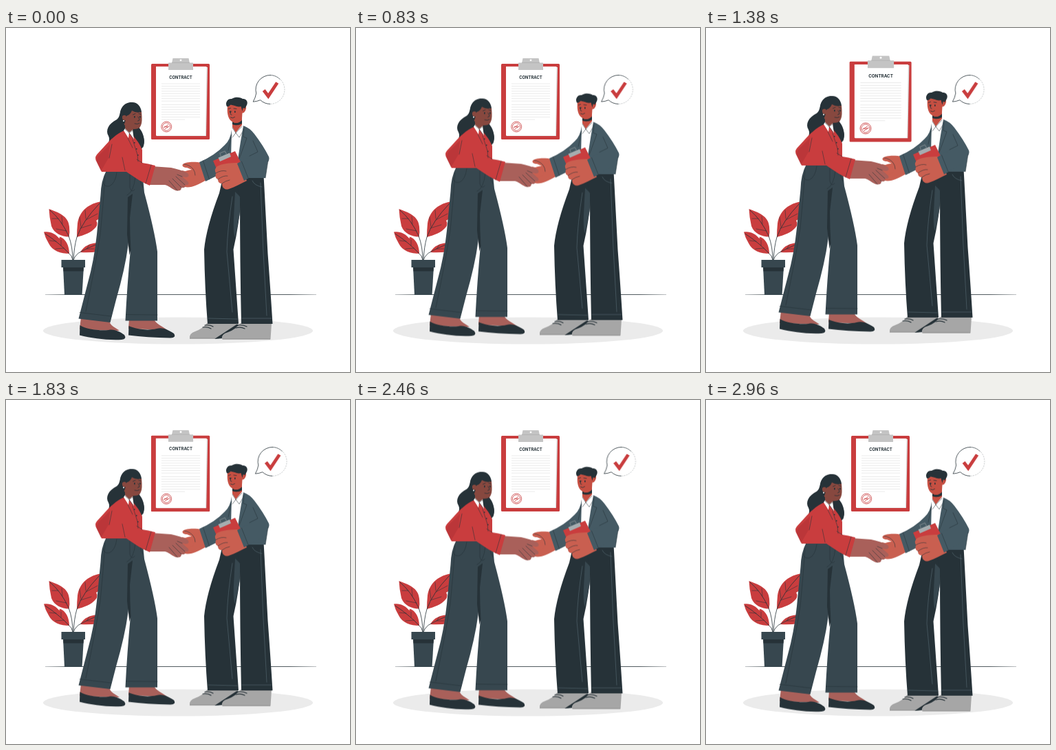
Recreate the animation shown at these times as an HTML page without scripts. Size 500x500 px, loop 3000 ms.

```html
<!DOCTYPE html>
<html lang="en">
<head>
<meta charset="utf-8">
<title>Contract handshake</title>
<style>
  html, body { margin: 0; width: 100%; height: 100%; overflow: hidden; background: #fff; }
  svg { display: block; width: 100%; height: 100%; }
  .red { fill: #c93d3e; }
  .dark { fill: #263238; }
  .slate { fill: #37474f; }
  .jacket { fill: #455a64; }
  .herskin { fill: #a9605a; }
  .herface { fill: #87483f; }
  .hisskin { fill: #c95f50; }
  .hisface { fill: #c54f42; }
  .line { fill: none; stroke: #263238; stroke-width: .8; stroke-linecap: round; stroke-linejoin: round; }
  .fine { stroke-width: .55; }
  .bold { stroke-width: 1.2; }
  .pale { stroke: #5c707a; }
  .title { font: 700 5.9px Inter, "Open Sans", sans-serif; text-anchor: middle; fill: #263238; }

  .float { animation: float 3s linear infinite; }
  .beat { transform-origin: 253.5px 104px; animation: beat 3s ease-in-out infinite; }
  .shake { animation: shake 3s linear infinite; }

  @keyframes float { 50% { transform: translateY(-10px); } }
  @keyframes beat {
    0%, 28%, 66%, 100% { transform: scale(1); }
    14%, 42% { transform: scale(1.065); }
  }
  @keyframes shake {
    10%, 90% { transform: translateX(-1px); }
    20%, 80% { transform: translateX(2px); }
    30%, 50%, 70% { transform: translateX(-4px); }
    40%, 60% { transform: translateX(4px); }
  }
</style>
</head>
<body>
<svg viewBox="0 0 500 500">
  <defs>
    <linearGradient id="fade">
      <stop offset="0" stop-color="#263238" stop-opacity=".3"/>
      <stop offset=".1" stop-color="#263238" stop-opacity=".8"/>
      <stop offset=".9" stop-color="#263238" stop-opacity=".8"/>
      <stop offset="1" stop-color="#263238" stop-opacity=".3"/>
    </linearGradient>
  </defs>

  <rect x="57" y="387" width="394" height="1" fill="url(#fade)"/>
  <ellipse cx="250" cy="440" rx="196" ry="19.6" fill="#ebebeb"/>

  <g id="plant">
    <g class="red">
      <path d="M62.500 263C76 268 91 273 92 289Q93 297 91.500 303.500C81 303 70 299 66 288Q63 275 62.500 263Z"/>
      <path d="M139 252C121 255 107 265 104 284Q103 294 103 304C113 301 124 298 131 289Q134 284 131 280L139 275Z"/>
      <path d="M55 296.500C64 295 72 299 77.500 306L78 303.500C87 306 92 317 92 328C80 328 67 324 62 313Q57 305 55 296.500Z"/>
      <path d="M108 326C113 317 122 312 137 312L134 325Q121 327 108 326Z"/>
    </g>
    <path class="line" stroke-width="1" d="M97 337Q97 318 91 302Q80 278 64 265M98 337Q99 318 103 304Q111 281 136 255M97 337Q96 331 91 327Q78 313 57 299M98 337Q101 329 109 325Q120 319 133 314"/>
    <path class="line fine" d="M82 285L81 274M76 277L67 277M88 295L73 292M109 289L107 275M116 277L115 265M108 291L124 286M116 279L133 270M80 316L80 308M73 310L63 309M84 320L72 321M118 320L121 315M117 321L128 321"/>
    <path class="slate" d="M83 347H113L110.500 388H85Z"/>
    <path class="dark" d="M83 347H113L112.500 353.500H83.500Z"/>
    <path class="slate" d="M80.500 337H115V348H80.500Z"/>
  </g>

  <g class="beat">
    <rect class="red" x="211" y="52" width="85" height="110" rx="1.500"/>
    <path d="M219 57H293L291 157H219Z" fill="#d9d9d9"/>
    <path d="M218 56H291.500L290 156.500H218Z" fill="#fff"/>
    <path d="M236 50.500H272V61H236ZM242.500 44H265.500L267 51H241Z" fill="#c4c4c4"/>
    <path d="M241 50.500H267" stroke="#aaa" stroke-width=".6"/>
    <circle cx="254" cy="46.800" r="1.400" fill="#fff"/>
    <text class="title" x="254" y="73.600">CONTRACT</text>
    <path d="M226 81H282M226 84.600H282M226 88.200H282M226 91.800H282M226 95.400H282M226 99H282M226 102.600H282M226 106.200H282M226 111.400H282M226 115H282M226 118.600H282M226 122.200H282M226 125.800H282M226 129.400H282M226 133H260" stroke="#e3e3e3" stroke-width=".7"/>
    <g fill="none" stroke="#c93d3e" stroke-width=".8">
      <circle cx="233.200" cy="143.500" r="7.500"/>
      <circle cx="233.200" cy="143.500" r="5.700"/>
      <path d="M229 145L236 140.500M230 143.600H236M230.500 147L237.500 142.500"/>
    </g>
  </g>

  <g class="shake">
    <g transform="translate(-.8 0)">
      <circle cx="384.500" cy="89.500" r="21" fill="#fff"/>
      <path class="line" d="M385 68.500A21 21 0 0 0 364.500 95Q363.500 101 360 107.200Q365 107 370.500 104.700A21 21 0 0 0 384.500 110.500"/>
      <path class="line fine" d="M385 68.500A21 21 0 0 1 384.500 110.500" stroke-dasharray="1.500 2" opacity=".45"/>
      <path class="line fine" d="M385 68.500Q393 68.500 399 74.500"/>
      <path d="M375.500 90.500L382 99L395 79.500" fill="none" stroke="#c93d3e" stroke-width="4.800"/>
    </g>
  </g>

  <g class="float">
    <g id="man">
      <path d="M267 451Q266 444 275 441Q286 437 292 429H337V435C326 442 316 449 309 451.500H267Z" fill="#a6a6a6"/>
      <path class="dark" d="M303 452Q320 441 335 431H343L337 437Q324 443 316 451Z"/>
      <path d="M314 452.500Q312 445 323 442Q334 438 340 429H386L384.500 452.500Z" fill="#a6a6a6"/>
      <path d="M267 451H304M315 452H384" stroke="#8f8f8f" stroke-width="1"/>
      <path class="line bold" d="M289 432Q296 431 301 434M286 435Q293 434 298 437M337 432Q344 431 350 434M334 436Q341 434 347 437"/>

      <path class="dark" d="M315 218L310 240Q291 290 288 322Q289 380 293 430H338L330.500 322Q339 285 342 245V216H320Z"/>
      <path class="slate" d="M333 238L341 246L339.500 272L333 304Q330 300 331 275Z"/>
      <path class="dark" d="M336 230L340 246Q340 340 342 430H387.500Q384 375 380.500 328L374.500 214H338Z"/>
      <path class="line pale fine" d="M329 245Q322 290 321 325L329 413M370 225Q373 320 379 418M294 422L336 423M343 422L386 422M358 222Q361 229 372 231"/>

      <path d="M330 146L343 145L352 160L345 200H322L325 160Z" fill="#fff"/>
      <path class="hisface" d="M329 130H343V146L334 153L329 149Z"/>
      <path class="dark" d="M329 136Q336 141 343 134V139Q336 143 329 140Z"/>
      <path d="M329 144L334 152L329 159L326 150ZM343 141L347 146L339 159L334 152Z" fill="#fff"/>
      <path class="line fine" d="M329 145L334 152.500L343 143M334 152.500L329 159M334 152.500L339 159L346 147"/>

      <path class="hisskin" d="M285 196C275 194 262 194 257 198C255 201 259 203 263 203L270 206C260 207 254 211 252 217L256 230C267 234 277 229 291 221Z"/>
      <path class="line fine" d="M259 198Q267 199 272 205Q275 209 275 214"/>
      <path class="jacket" d="M328 148Q326 163 318 170Q304 185 281 195L290 223Q304 216 320 208L327 190Z"/>
      <path class="line fine" d="M286.500 193L295.500 220M328 155L323 178M312 190L323 182"/>

      <path class="jacket" d="M345 142Q354 145 361 154Q374 171 382 187Q383.500 191 380.500 195L377 218H350L342 206L337 191L341 165Z"/>
      <path class="red" d="M301 193L333 179L341 195Q335 207 327 211L307 207Z"/>
      <path d="M308.500 188.500L325 181.500L327 187L311 194Z" fill="#a6adb0"/>
      <path d="M312.500 187L311 182L318 179L320.500 183" fill="none" stroke="#68777e" stroke-width="1.500"/>
      <path class="hisskin" d="M338 196C326 196 314 197 307 201Q302 205 305 211Q303 218 308 220Q308 226 314 226C314 233 319 236 324 234C333 231 341 226 350 222Z"/>
      <path class="line fine" d="M305 211Q313 206 320 208M308 220Q316 214 322 215M314 226Q319 222 325 221"/>
      <path class="jacket" d="M336 197L366 180L382 188Q380 199 372 207L346 222Z"/>
      <path class="line fine" d="M342.500 194L352 218M354 186L366 180L359 164M346 146L345 158L350 160L339 190M381 193L377 218"/>

      <path class="hisface" d="M322 112L346 109Q351 114 348 120Q346 124 343.500 123.500L343 131C341 138 334 140 328.500 136C322 132 321 122 322 112Z"/>
      <path class="dark" d="M321 114C318 109 322 102 328 103C334 99 342 101 344 103C351 103 352 109 349.500 113L347 117L344.500 116L343.500 121L341.500 114C336 116 330 111 326 112Q323 115 321 114Z"/>
      <path class="line" d="M323.500 117.500L326.500 116.500M331 117L335 117.500M327.500 121Q325 125 327 126H328M326.500 130Q329.500 132 332.500 129.500"/>
      <path class="dark" d="M325 120.500h1.600v2.400h-1.600ZM332 120.500h1.600v2.400h-1.600Z"/>
    </g>

    <g id="woman">
      <path class="dark" d="M174 112C163 117 168 128 161 133C149 139 144 149 149 157Q152 163 147 170L197 176C203 168 201 158 197 150Q193 144 190 140Z"/>
      <path class="herskin" d="M109 420L150 425C151 433 160 436 165 440L107 438ZM179 422H214C218 431 229 434 234 439L178 437Z"/>
      <path class="dark" d="M107.500 432C116 438 135 440 149 439C158 437 166 442 172 446Q176 452 168 453C146 454 125 451 107 446.500Z"/>
      <path class="dark" d="M178.500 433C190 438 206 440 219 437C228 434 238 440 244 444Q248 450 239 450.500Q205 450 178 446.500Z"/>

      <path class="slate" d="M146 207Q138 222 137.500 243L132 300Q128 338 119 370L105.500 422.500L151.500 428L160 395Q173 350 177.500 316L179 301L181 322Q176 375 173.500 425.500H220V325Q216 295 201 239L198 207Z"/>
      <path class="dark" d="M177 246L184 241L180 276Q180 300 181.500 322L179.500 330L176 300Z"/>
      <path class="line fine" d="M144 216Q141 260 137 300Q130 345 116 412M107 413.500L153 419M174.500 416.500L220 417M141 224Q142 231 150 230Q159 226 161 210M176 243Q186 238 188 216M180 213L180 232Q182 240 187 235M196 215Q194 225 199 232"/>

      <path class="hisskin" d="M256 207L271 211L273 219L258 226Z"/>
      <path class="herskin" d="M212 201L240 203C248 205 257 207 264 211Q268 216 262 217L256 216L265 224Q267 229 260 228Q262 233 255 232Q255 238 246 236C240 233 236 229 231 228H207Z"/>
      <path class="line fine" d="M247 216L260 228M242 219L255 232M237 222L249 236M256 216L249 213"/>

      <path class="red" d="M172 149C160 154 150 164 143 172L132 184Q128 189 132 195L139 209H175C188 218 199 225 209 229L217 200Q206 197 198 196L198 177Q193 165 183 155Z"/>
      <path d="M151 169L149 189L138 208L132 195Q130 188 139 181Z" fill="#a82d32" opacity=".4"/>
      <path class="line fine" d="M211 199L203 226M198 196L190 191M173 207L169 188M184 162L191 184L192 194M154 169L150 189M177 160L184 174"/>
      <path class="dark" d="M186 166h1.500v1.500h-1.500ZM189 175h1.500v1.500h-1.500ZM191 184h1.500v1.500h-1.500Z"/>
      <path class="dark" d="M185 149Q193 155 194 163Q195 170 199 174C203 165 200 156 195 148L190 143Z"/>
      <path class="herface" d="M173 139H186L184 152L179 155L173 149Z"/>
      <path d="M173 146L179 152L178 160L171 149ZM184 148L186 162L179 152Z" fill="#fff"/>
      <path class="line fine" d="M173 147L179 152.500L184 149M179 152.500L185 161"/>

      <path class="herface" d="M174 121Q186 112 197 122C198 133 198 140 194 145Q187 149 179 145L172 141L168 130Z"/>
      <path class="dark" d="M167 133C163 117 172 108 182 108C190 107 196 113 197 122Q189 124 183 120C180 128 176 126 174 129Q174 138 170 142Z"/>
      <path class="herface" d="M174 127Q168 126 169 131Q170 135 174 134Z"/>
      <circle cx="171" cy="135" r="1" fill="#fff"/>
      <path class="line" d="M184.500 126L188 124.500M193 124.500L196 125.500M192 129Q194 132 194 134L191.500 135M187 139Q191 140.500 194 138.500"/>
      <path class="dark" d="M186 128h1.700v2.500h-1.700ZM194 128h1.600v2.500h-1.600Z"/>
    </g>
  </g>
</svg>
</body>
</html>
```
